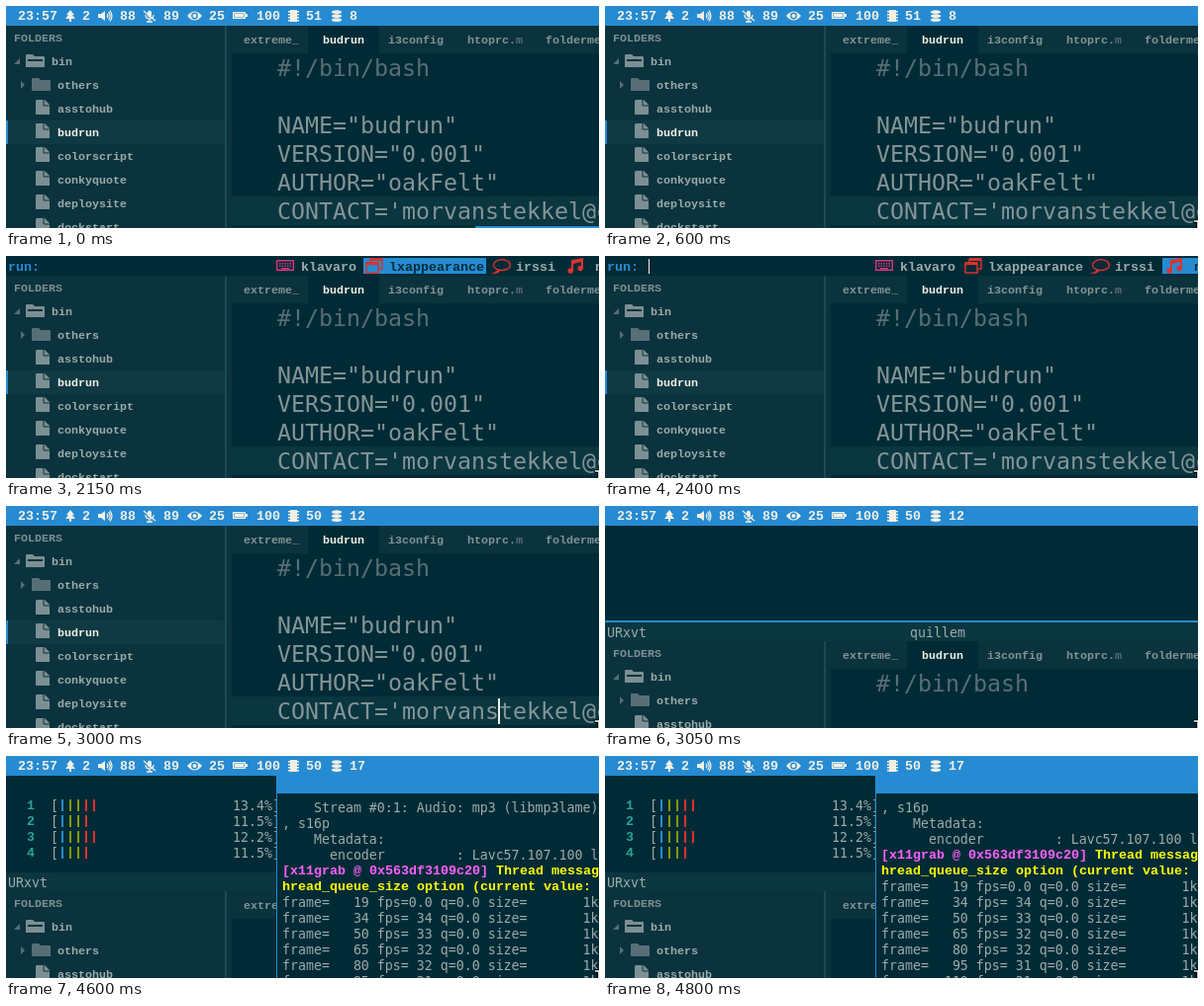
Animation of 599 by 225 pixels, one loop 4850 ms. Source, as an HTML page with a canvas:

```html
<!DOCTYPE html>
<html lang="en">
<head>
<meta charset="utf-8">
<title>Desktop launcher</title>
<style>
  html, body { margin: 0; width: 100%; height: 100%; overflow: hidden; background: #002b36; }
  canvas { display: block; width: 599px; height: 225px; }
</style>
</head>
<body>
<canvas id="stage" width="599" height="225"></canvas>
<script>
const ctx = document.getElementById('stage').getContext('2d');
const W = 599, H = 225, LOOP = 4850;
const C = {
  base: '#002b36', side: '#0a333d', row: '#0f3a44', line: '#0a3640', edge: '#1b4a54',
  blue: '#268bd2', white: '#f3f0e4', text: '#9dabaa', code: '#839496', dim: '#586e75',
  icon: '#7c8f93', cyan: '#2aa198', green: '#859900', red: '#dc322f',
  magenta: '#d33682', pink: '#ff5fff', yellow: '#ffff00'
};

function rect(x, y, w, h, color) {
  ctx.fillStyle = color;
  ctx.fillRect(x, y, w, h);
}

// Monospaced text, vertically centred on y, sized by its character advance.
function text(str, x, y, color, advance = 8) {
  const size = advance / 0.602;
  ctx.font = `${size}px "DejaVu Sans Mono", monospace`;
  ctx.fillStyle = color;
  ctx.fillText(str, x, Math.round(y + size * 0.35));
}

function bold(str, x, y, color, advance = 7) {
  const size = advance / 0.6;
  ctx.font = `bold ${size}px "Liberation Mono", monospace`;
  ctx.fillStyle = color;
  ctx.fillText(str, x, Math.round(y + size * 0.33));
}

// Consecutive coloured pieces: [string, color, string, color, ...]
function spans(x, y, ...parts) {
  for (let i = 0; i < parts.length; i += 2) {
    text(parts[i], x, y, parts[i + 1]);
    x += parts[i].length * 8;
  }
}

function shape(d, x, y, color, width = 0) {
  ctx.save();
  ctx.translate(x, y);
  const path = new Path2D(d);
  if (width) {
    ctx.strokeStyle = color;
    ctx.lineWidth = width;
    ctx.stroke(path);
  } else {
    ctx.fillStyle = color;
    ctx.fill(path);
  }
  ctx.restore();
}

function dot(x, y, r, color) {
  ctx.fillStyle = color;
  ctx.beginPath();
  ctx.arc(x, y, r, 0, Math.PI * 2);
  ctx.fill();
}

function statusIcons() {
  const w = C.white;
  shape('M5 0L9 5H7L10 9H6V12H4V9H0L3 5H1Z', 60, 4, w);
  shape('M0 4H3L7 1V11L3 8H0Z', 93, 4, w);
  shape('M9 4Q11 6 9 8M10.5 2Q14 6 10.5 10M12 .5Q16 6 12 11.5', 93, 4, w, 1.2);
  shape('M5 2Q7 -1 9 2V6Q7 9 5 6Z', 138, 4, w);
  shape('M3 5Q3 9 7 9Q11 9 11 5M7 9V12M4 12H10M1 1L13 11', 138, 4, w, 1.3);
  shape('M0 5Q7.5 -4 15 5Q7.5 14 0 5Z', 183, 5, w);
  dot(190.5, 10, 3.4, C.blue);
  dot(190.5, 10, 2, w);
  shape('M.7 .7H12.3V6.3H.7Z', 229, 6, w, 1.4);
  rect(231, 8, 9, 3, w);
  rect(242, 8, 2, 3, w);
  rect(287, 4, 7, 12, w);
  for (let i = 0; i < 4; i++) rect(285, 5 + i * 3, 11, 1.5, w);
  for (let i = 0; i < 3; i++) shape('M0 1.5Q5 -1 10 1.5V3Q5 5 0 3Z', 329, 4 + i * 4, w);
}

function statusBar(cpu, disk) {
  rect(0, 0, W, 20, C.blue);
  const items = ['23:57', 12, '2', 77, '88', 115, '89', 159, '25', 205, '100', 253, cpu, 303, disk, 347];
  for (let i = 0; i < items.length; i += 2) bold(items[i], items[i + 1], 10, C.white, 8);
  statusIcons();
}

function menuIcon(i, x, color) {
  if (i === 0) {
    shape('M.7 .7H17.3V10.3H.7Z', x, 4, color, 1.4);
    for (let r = 0; r < 2; r++)
      for (let k = 0; k < 5; k++) rect(x + 3 + k * 2.6, 7 + r * 2.5, 1.5, 1.5, color);
    rect(x + 5, 12, 8, 1.5, color);
  } else if (i === 1) {
    shape('M5 1H17V11H14M5 1V4M1 5H13V15H1Z', x, 2, color, 1.5);
    rect(x + 1, 6, 12, 3, color);
    rect(x + 5, 2, 12, 3, color);
  } else if (i === 2) {
    shape('M5 11Q-2 8 2 3Q9 -2 16 3Q20 9 12 11Q8 12 7 11Q5 14 2 14Q5 13 5 11Z', x, 3, color, 1.4);
  } else {
    shape('M4 2L16 0V11H14V4L6 6V14H4Z', x, 2, color);
    dot(x + 3.2, 15, 2.7, color);
    dot(x + 13.2, 12.5, 2.7, color);
  }
}

const MENU = [
  { label: 'klavaro', x: 298, icon: 273, box: [270, 86], color: C.magenta },
  { label: 'lxappearance', x: 387, icon: 363, box: [361, 124], color: C.red },
  { label: 'irssi', x: 515, icon: 492, box: [489, 68], color: C.red },
  { label: 'ncmpcpp', x: 595, icon: 567, box: [563, 90], color: C.red }
];

function launcher(selected, caret) {
  rect(0, 0, W, 20, C.base);
  bold('run:', 2, 11, C.blue, 8);
  if (caret) rect(44, 3, 1, 15, C.white);
  MENU.forEach((m, i) => {
    const on = i === selected;
    if (on) rect(m.box[0], 2, m.box[1], 16, C.blue);
    menuIcon(i, m.icon, m.color);
    bold(m.label, m.x, 11, on ? C.base : C.text, 8);
  });
}

function folder(x, y, open) {
  shape('M0 1Q0 0 1 0H7L9 2H18Q19 2 19 3V13H0Z', x, y, open ? C.icon : C.dim);
  if (open) rect(x + 2, y + 5, 15, 2, C.side);
}

function fileIcon(y) {
  shape('M1 0H9L14 5V15H0V1Z', 30, y - 9, C.icon);
  shape('M8 0V6H14', 30, y - 9, C.side, 1);
}

function sidebar() {
  rect(0, 20, 228, H, C.side);
  rect(0, 116, 222, 24, C.row);
  rect(0, 116, 2, 24, C.blue);
  rect(221, 20, 2, H, C.edge);
  bold('FOLDERS', 8, 32, C.icon);
  shape('M6 0V6H0Z', 8, 53, C.dim);
  shape('M0 0L4 4L0 8Z', 15, 76, C.dim);
  folder(20, 49, true);
  folder(26, 73, false);
  bold('bin', 46, 56, C.text);
  bold('others', 52, 80, C.text);
  ['asstohub', 'budrun', 'colorscript', 'conkyquote', 'deploysite', 'dockstart'].forEach((name, i) => {
    const y = 104 + i * 24;
    fileIcon(y);
    bold(name, 52, y, i === 1 ? C.white : C.text);
  });
}

function tabs() {
  rect(228, 20, W, 28, C.side);
  rect(305, 20, 72, 28, C.base);
  const names = ['extreme_', 240, 'budrun', 320, 'i3config', 386, 'htoprc.m', 466, 'folderme', 545];
  for (let i = 0; i < names.length; i += 2) {
    const name = names[i], x = names[i + 1];
    const cut = name === 'htoprc.m' ? 7 : name.length;
    bold(name.slice(0, cut), x, 34, i === 2 ? C.white : C.code);
    if (cut < name.length) bold(name.slice(cut), x + cut * 7, 34, C.dim);
  }
}

function editor(shift, caret) {
  ctx.save();
  ctx.translate(0, shift);
  rect(228, 20, W, H, C.base);
  sidebar();
  tabs();
  rect(228, 193, W, 29, C.line);
  text('#!/bin/bash', 274, 63, C.dim, 14);
  ['NAME="budrun"', 'VERSION="0.001"', 'AUTHOR="oakFelt"', "CONTACT='morvanstekkel@c"].forEach(
    (line, i) => text(line, 274, 121 + i * 29, C.code, 14));
  if (caret) rect(497, 195, 2, 26, C.white);
  ctx.restore();
}

function meters(loads, colors) {
  loads.forEach((load, i) => {
    const y = 50 + i * 16;
    bold(String(i + 1), 21, y, C.cyan, 8);
    text('[', 45, y, C.text);
    [...colors[i % 2]].forEach((c, k) =>
      rect(56 + k * 8, y - 6, 2, 12, { b: C.blue, g: C.green, r: C.red }[c]));
    text(load + '%]', 229, y, C.text);
  });
}

function monitor(late) {
  if (late) meters(['13.4', '11.5', '12.2', '11.5'], ['bggrr', 'bggr']);
  else meters(['15.7', '14.9', '15.7', '16.1'], ['bgggrr', 'bgggrr']);
  const x = 302, w = '#c3cbc6';
  spans(x, 50, 'Tasks: ', C.cyan, '79', w, '; ', C.cyan, '1', C.dim, ' running', C.cyan);
  spans(x, 66, 'Load average: ', C.cyan, '0.42 ', C.text, '0.19 ', w, '0.17', C.cyan);
  spans(x, 82, 'Uptime: ', C.cyan, '09:09:52', w);
  spans(x, 98, 'Mem:', C.cyan, '3.74G', w, ' used:', C.cyan, '1.64G', C.green,
    ' buffers:', C.cyan, '1.08M', w, ' cache:', C.cyan);
}

function splitPane(t) {
  const focused = t < 4600;
  rect(0, 20, W, 97, C.base);
  if (t >= 3850) monitor(!focused);
  rect(0, 116, W, 21, C.line);
  rect(0, 116, W, 2, focused ? C.blue : C.base);
  text('URxvt', 2, 128, C.text);
  text('quillem', 308, 128, C.text);
}

function progress(count, fps) {
  return `frame=${String(count).padStart(5)} fps=${fps} q=0.0 size=       1k`;
}

function recorder(scrolled) {
  rect(273, 20, W, H, C.base);
  rect(273, 20, 1, H, C.blue);
  rect(273, 20, W, 18, C.blue);
  const x = 279;
  let y = scrolled ? 52 : 68;
  if (!scrolled) text('    Stream #0:1: Audio: mp3 (libmp3lame)', x, 52, C.text);
  const put = (draw) => { draw(y); y += 16; };
  const plain = (str) => put((py) => text(str, x, py, C.text));
  plain(', s16p');
  plain('    Metadata:');
  plain('      encoder         : Lavc57.107.100 l');
  put((py) => {
    bold('[x11grab @ 0x563df3109c20]', x, py, C.pink, 8);
    bold('Thread message', x + 27 * 8, py, C.yellow, 8);
  });
  put((py) => bold('hread_queue_size option (current value: ', x, py, C.yellow, 8));
  plain(progress(19, '0.0'));
  [34, 50, 65, 80, 95, 110].forEach((n, i) => plain(progress(n, ' ' + [34, 33, 32, 32, 31, 31][i])));
}

function pointer() {
  shape('M-1 1H5M3 1V9', 596, 217, '#000', 4);
  shape('M-1 1H5M3 1V9', 596, 217, '#fff', 1.5);
}

function selection(t) {
  return t < 2150 ? 0 : t < 2300 ? 1 : t < 2400 ? 2 : 3;
}

function draw(t) {
  t = Math.floor(t / 50) * 50;
  const split = t >= 3050;
  rect(0, 0, W, H, C.base);
  editor(split ? 117 : 0, t === 3000);
  if (split) splitPane(t);
  if (t >= 4600) recorder(t >= 4800);
  if (t < 250) rect(474, 223, 125, 2, C.blue);

  statusBar(t < 3000 ? '51' : '50', t < 3000 ? '8' : t < 3950 ? '12' : '17');
  if (t >= 800 && t < 3000) {
    ctx.globalAlpha = Math.min(1, (t - 750) / 300);
    const caret = t < 1650 || (t >= 2250 && t < 2850);
    launcher(selection(t), caret);
    ctx.globalAlpha = 1;
  }
  if (t >= 400) pointer();
}

function tick() {
  draw(performance.now() % LOOP);
  requestAnimationFrame(tick);
}
tick();
</script>
</body>
</html>
```
